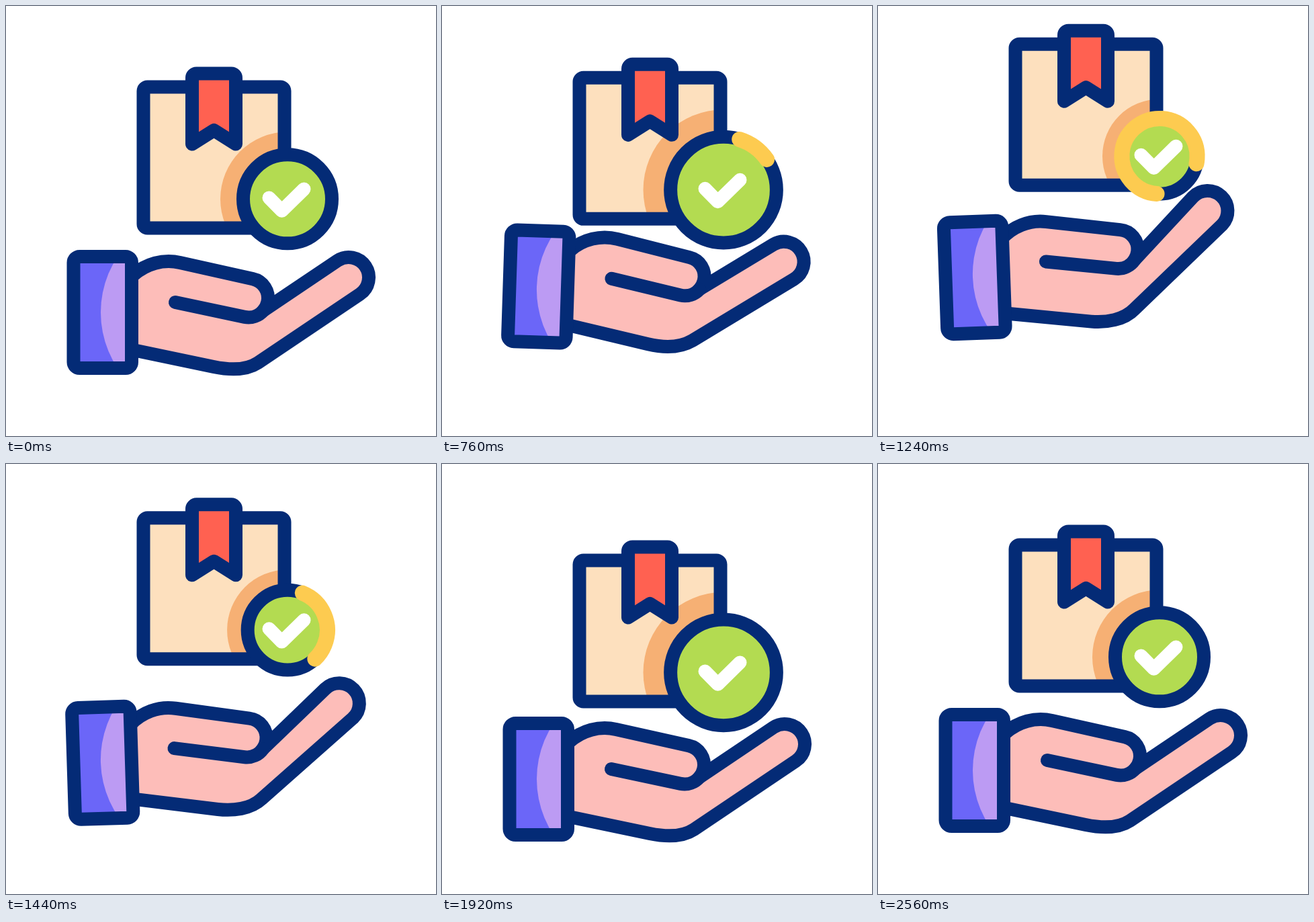
These frames come from a looping animation (640 by 640 pixels, 3 s). An HTML page with a canvas:

```html
<!DOCTYPE html>
<html lang="en">
<head>
<meta charset="utf-8">
<title>Parcel in hand</title>
<style>
  html, body { margin: 0; width: 100%; height: 100%; overflow: hidden; background: #fff; }
  canvas { display: block; width: 640px; height: 640px; }
</style>
</head>
<body>
<canvas id="stage" width="640" height="640"></canvas>
<script>
const ctx = document.getElementById('stage').getContext('2d');
const LOOP = 3000, STEP = 40, RAD = Math.PI / 180;
const NAVY = '#042b76', SKIN = '#fdbdb9', YELLOW = '#fdcb50';

// Keyframes are [ms, value]; angles are in degrees.
const handY = [[120, 0], [430, 20.5], [680, -27], [760, -38.5], [1040, -57],
               [1240, -52], [1600, 23], [1665, 27], [1920, 13], [2250, 0]];
const cuffTurn = [[120, 0], [580, 2.9], [760, 1.86], [1300, -2.1], [1600, -1.1], [1820, 0]];
const fingerTurn = [[120, 0], [500, 11.6], [680, 6.5], [760, 3.2], [1260, -12.8], [1600, -5.2], [1820, 0]];
const fingerReach = [[500, 1], [760, 0.97], [1240, 0.962], [1600, 0.984], [1840, 1]];
const boxY = [[565, 0], [1220, -64], [1862, 23.6], [2460, 0]];
const badgeScale = [[421, 1], [720, 1.2], [1270, 0.847], [1970, 1.2], [2520, 1]];
const arcHead = [[640, 0], [1240, 360]];
const arcTail = [[1042, 0], [1680, 360]];

// Monotone cubic through the keyframes, flat at the ends and at every extreme.
function valueAt(keys, t) {
  const last = keys.length - 1;
  if (t <= keys[0][0]) return keys[0][1];
  if (t >= keys[last][0]) return keys[last][1];
  const slope = i => (keys[i + 1][1] - keys[i][1]) / (keys[i + 1][0] - keys[i][0]);
  const tangent = i => {
    if (i === 0 || i === last) return 0;
    const a = slope(i - 1), b = slope(i);
    return a * b <= 0 ? 0 : 2 * a * b / (a + b);
  };
  let i = 0;
  while (t >= keys[i + 1][0]) i++;
  const [t0, v0] = keys[i], [t1, v1] = keys[i + 1];
  const span = t1 - t0, x = (t - t0) / span, y = 1 - x;
  return v0 * y * y * (1 + 2 * x) + v1 * x * x * (3 - 2 * x)
       + span * x * y * (tangent(i) * y - tangent(i + 1) * x);
}

function stroke(color = NAVY, width = 20) {
  ctx.strokeStyle = color;
  ctx.lineWidth = width;
  ctx.stroke();
}

function fill(color) {
  ctx.fillStyle = color;
  ctx.fill();
}

function disc(x, y, r) {
  ctx.beginPath();
  ctx.arc(x, y, r, 0, 2 * Math.PI);
}

function turnAbout(x, y, degrees) {
  ctx.translate(x, y);
  ctx.rotate(degrees * RAD);
  ctx.translate(-x, -y);
}

// A bordered panel with a circular tint clipped to its inside.
function panel(x, y, w, h, r, base, tint, cx, cy, cr) {
  ctx.save();
  ctx.beginPath();
  ctx.rect(x, y, w, h);
  fill(base);
  ctx.clip();
  disc(cx, cy, cr);
  fill(tint);
  ctx.restore();
  ctx.beginPath();
  ctx.roundRect(x, y, w, h, r);
  stroke();
}

function drawPalm(palm, finger, reach) {
  const bend = finger - palm;
  const tilt = -33.6 * RAD;
  const heel = { x: 375, y: 531 - 0.4 * Math.abs(finger) };
  const heelDir = tilt + bend * RAD;

  ctx.beginPath();
  ctx.moveTo(190, 400);
  ctx.bezierCurveTo(208, 384, 234, 376, 259, 382);
  ctx.arc(361, 434.5, 29, -78 * RAD, 40 * RAD);
  ctx.save();
  turnAbout(384, 451, bend);
  ctx.arc(384 + 126 * reach, 451 - 47 * reach, 30, tilt - Math.PI / 2, tilt + Math.PI / 2);
  ctx.restore();
  ctx.lineTo(heel.x, heel.y);
  ctx.bezierCurveTo(heel.x - 22 * Math.cos(heelDir), heel.y - 22 * Math.sin(heelDir),
                    331, 541.5, 309, 537);
  ctx.lineTo(187, 511.5);
  fill(SKIN);
  stroke();

  ctx.beginPath();
  ctx.arc(361, 434.5, 29, 40 * RAD, 101.5 * RAD);
  ctx.lineTo(252, 441);
  stroke();
}

function drawHand(t) {
  const cuff = valueAt(cuffTurn, t);
  const finger = valueAt(fingerTurn, t);
  const palm = finger / 2;
  ctx.save();
  ctx.translate(0, valueAt(handY, t));
  turnAbout(144, 456, cuff);
  ctx.save();
  turnAbout(189, 456, palm - cuff);
  drawPalm(palm, finger, valueAt(fingerReach, t));
  ctx.restore();
  panel(100.5, 373, 86.5, 166, 9, '#6b66f8', '#bc9bf3', 291, 456, 150);
  ctx.restore();
}

function drawRibbon() {
  ctx.beginPath();
  ctx.moveTo(277, 205.5);
  ctx.lineTo(277, 107);
  ctx.arcTo(277, 100.5, 284, 100.5, 6.5);
  ctx.lineTo(335, 100.5);
  ctx.arcTo(342, 100.5, 342, 107, 6.5);
  ctx.lineTo(342, 205.5);
  ctx.lineTo(309.5, 185);
  ctx.closePath();
  fill('#ff6151');
  stroke();
}

function drawBadge(t, scale) {
  const x = 419, y = 287.3, r = 66 * scale;
  disc(x, y, r);
  fill('#b3db51');
  stroke();

  const head = valueAt(arcHead, t), tail = valueAt(arcTail, t);
  if (head - tail > 0.5) {
    const spin = 0.175 * Math.max(0, t - 660) - 90;
    ctx.beginPath();
    ctx.arc(x, y, r, (tail + spin) * RAD, (head + spin) * RAD);
    stroke(YELLOW, 23);
  }

  ctx.beginPath();
  ctx.moveTo(391.5, 285.5);
  ctx.lineTo(410.5, 304.8);
  ctx.lineTo(443.5, 272.5);
  stroke('#fff');
}

function drawParcel(t) {
  const scale = valueAt(badgeScale, t);
  ctx.save();
  ctx.translate(0, valueAt(boxY, t));
  panel(204.5, 120.5, 210, 210, 6, '#fde0be', '#f6b074', 419, 287.3, 100 * scale);
  drawRibbon();
  drawBadge(t, scale);
  ctx.restore();
}

function draw(now) {
  const t = Math.floor((now % LOOP) / STEP) * STEP;
  ctx.fillStyle = '#fff';
  ctx.fillRect(0, 0, 640, 640);
  ctx.lineCap = ctx.lineJoin = 'round';
  drawHand(t);
  drawParcel(t);
}

let start;
function tick(now) {
  start ??= now;
  draw(now - start);
  requestAnimationFrame(tick);
}
draw(0);
requestAnimationFrame(tick);
</script>
</body>
</html>
```
